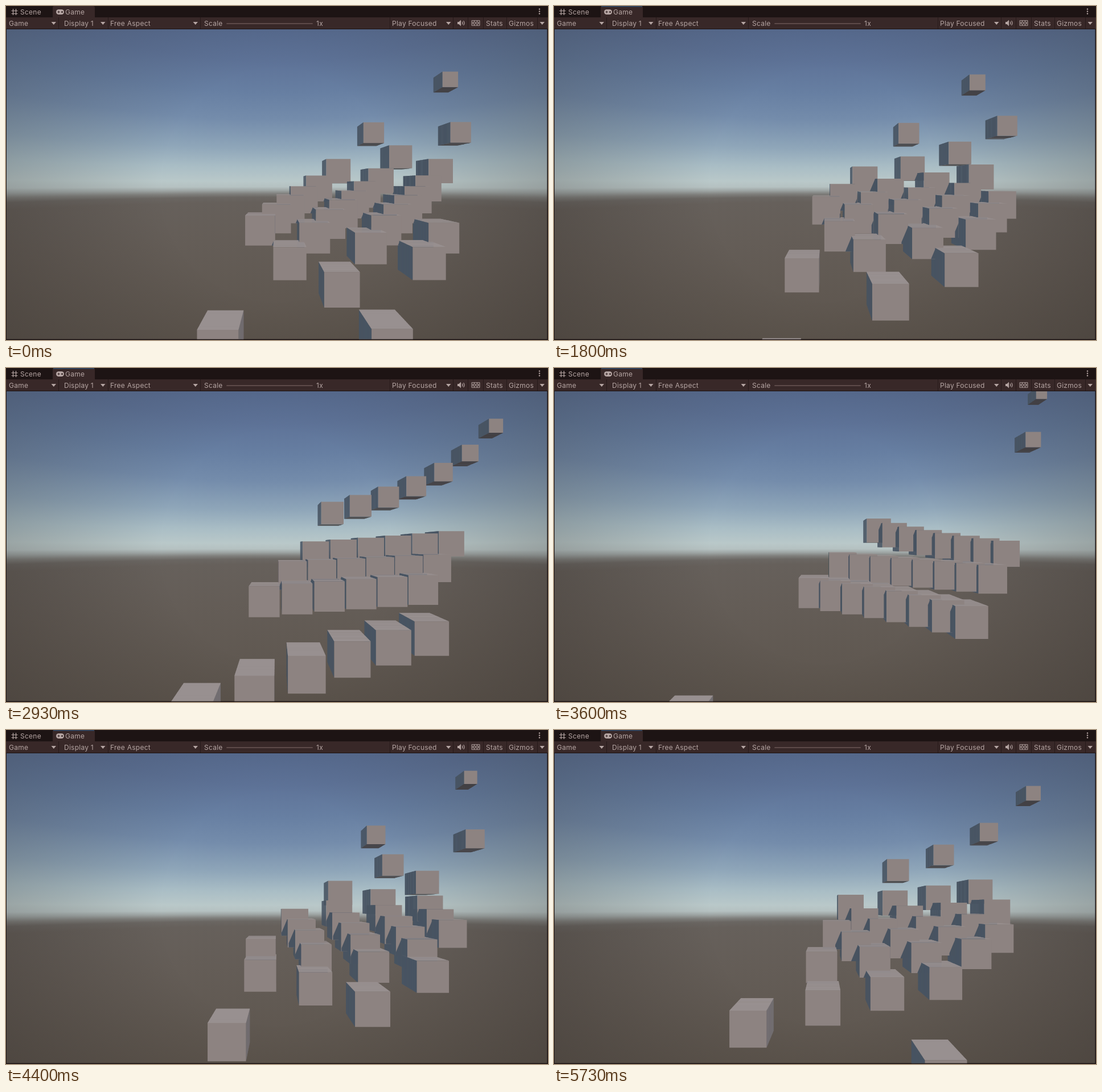
Write an HTML page with a canvas that moves like this. It is 952x588 px and loops after 5.87 s.

```html
<!DOCTYPE html>
<html lang="en">
<head>
<meta charset="utf-8">
<title>Tangent cubes</title>
<style>
  html, body { margin: 0; width: 100%; height: 100%; overflow: hidden; background: #1b1212; }
  canvas, svg { position: absolute; left: 0; top: 0; display: block; }
  text { font: 12px Inter, Roboto, sans-serif; letter-spacing: .25px; fill: #b5a5a3; }
  .icon { fill: #b5a5a3; }
  .line { fill: none; stroke: #b5a5a3; }
</style>
</head>
<body>
<canvas id="view" width="952" height="588"></canvas>
<svg width="952" height="41" viewBox="0 0 952 41">
  <rect width="952" height="41" fill="#1d1414"/>
  <path d="M82 20V3q0-3 3-3H153q3 0 3 3V20z" fill="#382828"/>
  <rect id="focus" x="83" width="72" height="1.5" fill="#2c4766"/>
  <rect y="20" width="952" height="20" fill="#382828"/>
  <path d="M92.5 20v20M179.5 20v20M341.5 20v20M674.5 20v20M785.5 20v20M811.5 20v20M838.5 20v20M879.5 20v20M933.5 20v20" stroke="#261a1a"/>
  <path class="line" d="M12.5 5v11M17.5 5v11M9.5 8.5h11M9.5 13.5h11" stroke-width="1.2"/>
  <rect class="icon" x="88" y="6" width="14" height="9" rx="4.5"/>
  <path d="M90.5 10.500h4M92.500 8.500v4" stroke="#382828" stroke-width="1.2"/>
  <circle cx="98.500" cy="10.500" r="1.500" fill="#382828"/>
  <g class="icon">
    <circle cx="937" cy="5.500" r="1.200"/><circle cx="937" cy="9.500" r="1.200"/><circle cx="937" cy="13.500" r="1.200"/>
    <path d="M79.500 28h8.500l-4.250 5zM166 28h8.500l-4.250 5zM328.500 28h8.500l-4.250 5zM773 28h8.500l-4.250 5zM937.500 28h8.500l-4.250 5z"/>
    <path d="M793 28h2.500l3.500-3.500v11l-3.500-3.500H793z"/>
  </g>
  <path class="line" d="M801 27.500q2 2.500 0 5M803.500 26q3 4 0 8" stroke-width="1.200"/>
  <path class="line" d="M818 25.500h14v9h-14zM818 28.500h14M818 31.500h14M822.500 25.500v3M827.500 25.500v3M820.500 28.500v3M825 28.500v3M829.500 28.500v3M822.500 31.500v3M827.500 31.500v3" stroke-width=".9"/>
  <rect x="387" y="30" width="152" height="2" rx="1" fill="#5d4a49"/>
  <text x="25" y="15">Scene</text><text x="104" y="15">Game</text>
  <text x="5" y="35">Game</text><text x="102" y="35">Display 1</text>
  <text x="183" y="35">Free Aspect</text><text x="348" y="35">Scale</text>
  <text x="545" y="35">1x</text><text x="678" y="35">Play Focused</text>
  <text x="843" y="35">Stats</text><text x="883" y="35">Gizmos</text>
</svg>
<script>
const canvas = document.getElementById('view');
const ctx = canvas.getContext('2d');
const focusLine = document.getElementById('focus');

const LOOP = 5870, STEP = 200 / 3, FIRST = 20, LAST = 86;
const CX = 475.5, CY = 313.5, FOCAL = 472;
const VIEW = [1, 41, 949.5, 545.5];
const COUNT = 32, SLICES = 24;
const LIGHT_X = -0.577, LIGHT_Y = -1.376; // shadow shift per unit of depth
const COLOR = { front: '#8d8381', top: '#989090', left: '#485462', right: '#747074', bottom: '#403d3e', shade: '#485360' };

// Scene clock: [step, seconds]
const CLOCK = [[20, 1.599], [34, 2.5125], [44, 3.188], [54, 3.854], [66, 4.652], [86, 5.94]];

function clockAt(step) {
  if (step < FIRST) return 1.4963;
  const n = CLOCK.findIndex(([s]) => s >= step);
  if (n === 0) return CLOCK[0][1];
  const [s0, t0] = CLOCK[n - 1], [s1, t1] = CLOCK[n];
  return t0 + (t1 - t0) * (step - s0) / (s1 - s0);
}

// Sky and ground depend on elevation, so the horizon bends away from the centre.
function makeBackdrop() {
  const layer = document.createElement('canvas');
  layer.width = 952;
  layer.height = 588;
  const g = layer.getContext('2d');
  const stops = [
    [-290, '#566a8f'], [-215, '#5e7398'], [-160, '#677f a2'.replace(' ', '')], [-113, '#748cab'],
    [-63, '#8fa6b9'], [-30, '#a9bdc5'], [-5, '#b9c8c9'], [5, '#b5c1c1'], [11, '#9ea5a4'],
    [17, '#7f7f7c'], [23, '#6a6662'], [32, '#66605b'], [100, '#645d57'], [290, '#5c544c']
  ];
  for (let x = 0; x < 952; x++) {
    const bend = 290 * Math.hypot(1, (x + 0.5 - CX) / FOCAL);
    const fill = g.createLinearGradient(0, CY - bend, 0, CY + bend);
    for (const [at, color] of stops) fill.addColorStop((at + 290) / 580, color);
    g.fillStyle = fill;
    g.fillRect(x, 41, 1, 546);
  }
  const dim = g.createRadialGradient(CX, CY, 200, CX, CY, 550);
  dim.addColorStop(0, 'rgba(20,14,10,0)');
  dim.addColorStop(1, 'rgba(20,14,10,.24)');
  g.fillStyle = dim;
  g.fillRect(0, 41, 952, 546);
  return layer;
}
const backdrop = makeBackdrop();

function trace(points) {
  ctx.beginPath();
  for (const [x, y, z] of points) ctx.lineTo(CX + x * FOCAL / z, CY - y * FOCAL / z);
  ctx.closePath();
}

function quad(points, color) {
  trace(points);
  ctx.fillStyle = color;
  ctx.fill();
}

// Cubes in camera space; z is the depth of the front face.
function makeCubes(time) {
  const cubes = [];
  for (let i = 0; i < COUNT; i++) {
    const wave = Math.tan(time * (1 + 0.2 * i) - 2);
    if (wave > -5.5 && wave < 24) cubes.push({ x: 0.2 * i + wave, y: wave - 1, z: wave + 9.5 });
  }
  return cubes;
}

function drawSides({ x, y }, near, far) {
  const l = x - 0.5, r = x + 0.5, b = y - 0.5, t = y + 0.5;
  const wall = (x0, y0, x1, y1, color) =>
    quad([[x0, y0, near], [x1, y1, near], [x1, y1, far], [x0, y0, far]], color);
  if (l > 0) wall(l, b, l, t, COLOR.left);
  if (r < 0) wall(r, b, r, t, COLOR.right);
  if (t < 0) wall(l, t, r, t, COLOR.top);
  if (b > 0) wall(l, b, r, b, COLOR.bottom);
}

function drawFront(cube, cubes) {
  const { x, y, z } = cube;
  const l = x - 0.5, r = x + 0.5, b = y - 0.5, t = y + 0.5;
  const face = [[l, b, z], [r, b, z], [r, t, z], [l, t, z]];
  quad(face, COLOR.front);
  ctx.save();
  trace(face);
  ctx.clip();
  for (const other of cubes) {
    const gap = z - other.z;
    if (gap <= 0) continue;
    const corner = (shift, dx, dy) =>
      [other.x + LIGHT_X * shift + dx, other.y + LIGHT_Y * shift + dy, z];
    const back = Math.max(0, gap - 1);
    quad([
      corner(back, 0.5, 0.5), corner(back, -0.5, 0.5), corner(gap, -0.5, 0.5),
      corner(gap, -0.5, -0.5), corner(gap, 0.5, -0.5), corner(back, 0.5, -0.5)
    ], COLOR.shade);
  }
  ctx.restore();
}

function drawScene(time) {
  ctx.fillStyle = '#1b1212';
  ctx.fillRect(0, 0, 952, 588);
  ctx.save();
  ctx.beginPath();
  ctx.rect(...VIEW);
  ctx.clip();
  ctx.drawImage(backdrop, 0, 0);

  // Thin slices drawn far to near let cubes pass through each other.
  const cubes = makeCubes(time), slices = [], depth = 1 / SLICES;
  for (const cube of cubes)
    for (let n = 0; n < SLICES; n++) slices.push({ cube, n, z: cube.z + n * depth });
  slices.sort((a, b) => b.z - a.z);
  for (const { cube, n, z } of slices) {
    drawSides(cube, z - 0.005, Math.min(z + depth * 1.5, cube.z + 1));
    if (n === 0) drawFront(cube, cubes);
  }
  ctx.restore();
}

let shown = -1;
const start = performance.now();
function tick(now) {
  const t = Math.max(0, now - start) % LOOP;
  const step = Math.max(FIRST - 1, Math.min(LAST, Math.floor((t + 4) / STEP)));
  if (step !== shown) {
    shown = step;
    focusLine.style.visibility = step < FIRST ? 'hidden' : 'visible';
    drawScene(clockAt(step));
  }
  requestAnimationFrame(tick);
}
tick(start);
</script>
</body>
</html>
```
